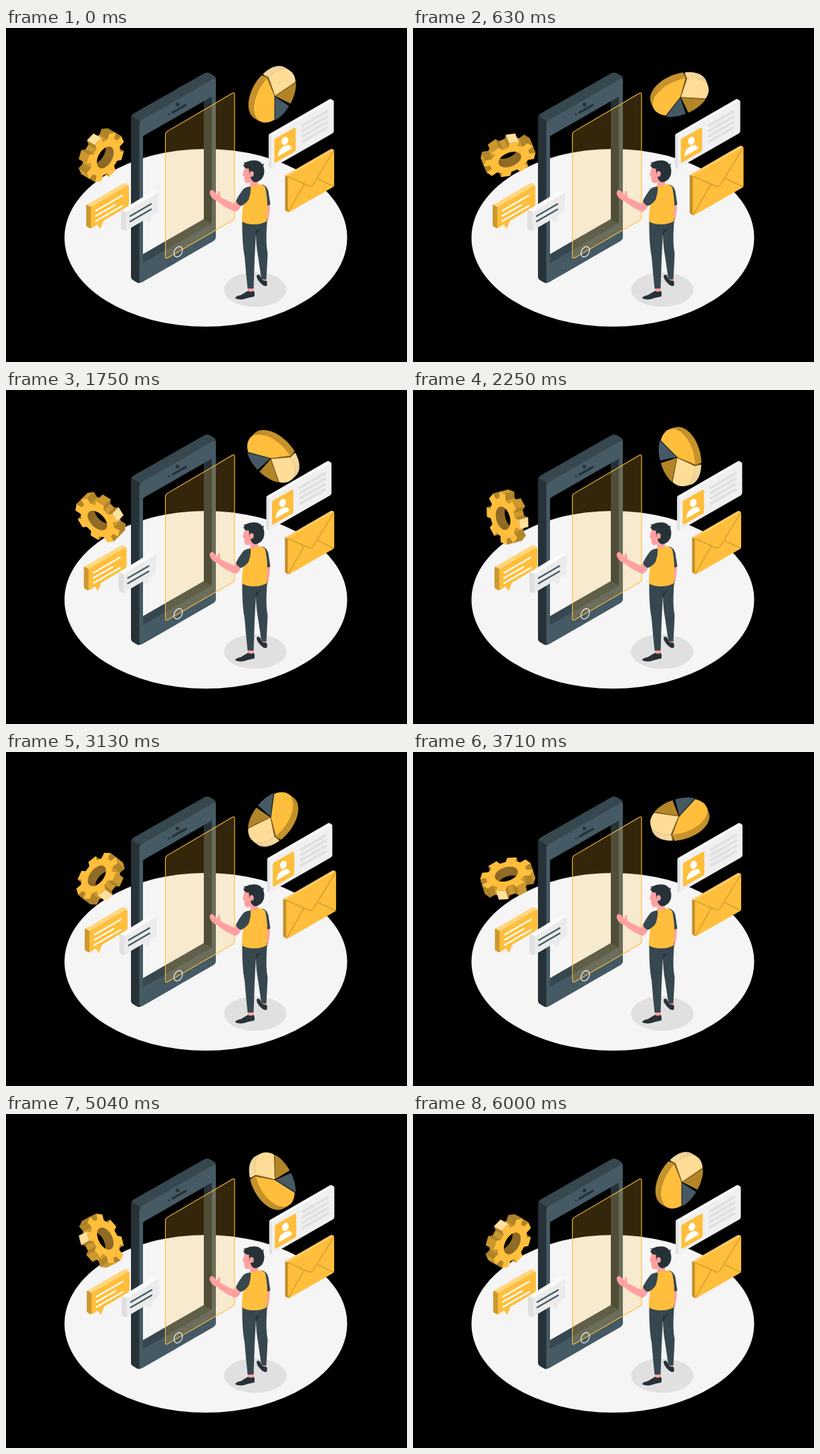
Recreate the animation shown at these times as an HTML page. Size 600x500 px, loop 6040 ms.

```html
<!DOCTYPE html>
<html lang="en">
<head>
<meta charset="utf-8">
<title>Mobile interface</title>
<style>
  html, body { margin: 0; width: 100%; height: 100%; overflow: hidden; background: #000; }
  svg { display: block; width: 600px; height: 500px; }
</style>
</head>
<body>
<svg viewBox="0 0 600 500" xmlns="http://www.w3.org/2000/svg">
  <ellipse cx="299" cy="314" rx="211.5" ry="133" fill="#f5f5f5"/>
  <ellipse cx="373" cy="391.7" rx="46.7" ry="25.8" fill="#e0e0e0"/>

  <g id="phone" fill-rule="evenodd">
    <path fill="#37474f" d="M187 135Q187 130.500 191 128L296 68.200Q301 65.500 305 67.800L311 71.200Q314 73 314 77L314 312Q314 316.500 310 319L205 379.600Q199 383 195 380.200L190 377.300Q187 375.500 187 371Z
      M205 163V338.500L296 286V109.500L207 160.500Q205 161.600 205 163Z"/>
    <path fill="#263238" d="M187 135Q187 133 188 131.500L200.500 139.500V381.300Q197 381.700 195 380.200L190 377.300Q187 375.500 187 371Z
      M296 109.500L309 102V293.500L296 286Z"/>
    <path fill="#455a64" d="M199.500 145Q199.500 140 204 137.500L309 77Q314 74.500 314 79L314 312Q314 316.500 310 319L205 379.600Q199.500 383 199.500 377Z
      M205 163V352L306 294Q308 292.700 308 290.500V104Q308 102.500 306.500 103.400L207 160.500Q205 161.600 205 163Z"/>
    <g fill="#263238">
      <circle cx="256.500" cy="114.500" r="2.800"/>
      <circle cx="244" cy="129.200" r="1.400"/>
      <path d="M249.300 126.500L269 115.200" stroke="#263238" stroke-width="3.400" stroke-linecap="round"/>
    </g>
  </g>

  <path d="M238.500 160Q238.500 156.500 241.500 154.600L339 97.500Q342 96 342 99.500V283Q342 286.300 339 288L242 344Q238.500 346 238.500 342Z"
    fill="#ffbe3b" fill-opacity=".2" stroke="#ffbe3b" stroke-width="1.100"/>
  <ellipse cx="257.700" cy="335" rx="5.700" ry="8.300" transform="rotate(28 257.700 335)" fill="none" stroke="#fff" stroke-width="1.100"/>

  <g id="man">
    <path fill="#ffa0a0" d="M362 385H370.500V396H362ZM382.500 372H390V382H383Z"/>
    <g fill="#ffa0a0">
      <path d="M390 262L395 262Q395 276 392.500 286Q391 292 388 294Z"/>
      <path d="M346 258L351 268Q346 276 342 275Q326 268 316 259Q308 256 306 251Q303 245 307 242.500Q310 242 313 246L317 250Q316 245 319 243.500Q321 246 320.500 253L341 263Z"/>
      <path d="M358 205Q355.500 214 354 220.500L356.500 222Q356 229 358.500 231.500Q362 233 365.500 231L365.500 240Q370 243 377 238L377 208Z"/>
    </g>
    <path fill="#37474f" d="M353.500 286Q353 322 357 342Q359 367 361.500 390H370.500Q371.500 360 372 345Q373 325 374 307Q374 325 377 341L382 375Q386 378 389.500 376Q391 353 391.500 337Q388 322 391 285Z"/>
    <path fill="#263238" d="M373 308L374.500 303L383 299Q377 304 374 311Z"/>
    <path fill="#37474f" d="M383 234Q390 236 392.500 244L395.500 264Q392 267 388 265Z"/>
    <path fill="#ffbe3b" d="M364.500 236Q370 239 377 234Q385 233.500 388 239Q391 252 391 266Q390 278 390.500 289Q383 294 371 294Q360 294 353 289.500Q353 268 358 252Z"/>
    <path fill="#37474f" d="M366 237.500Q357 237 353 244Q347 252 344 259Q346 264 351 266.500Q358 264 363 257Q367 246 366 237.500Z"/>
    <path fill="#263238" d="M355.300 201.500Q359 201.500 360 200.500Q366 197.500 373 198.300Q380 199 383.500 204Q385 204 386 202.500Q386 205 384.800 206Q388 214 385 222Q381 230 373 231Q368 230 366 224L366 221L364 219L363.500 210.500Q357 211 355 205Q356 204 357.500 204Z"/>
    <ellipse cx="367.500" cy="218.500" rx="3.200" ry="4.200" fill="#ffa0a0"/>
    <g fill="#263238">
      <path d="M362 393.500Q366 396 371 393.500Q373 399 371.300 402L362 404Q352 408.500 343 404.800Q343 401.500 351 400Z"/>
      <path d="M375 371Q376.500 368 380 370.500Q383 379.500 390 378.500Q391.500 383 390 386Q385 387 381 382Q375 376 375 371Z"/>
    </g>
  </g>

  <g id="gear"></g>
  <g id="pie"></g>

  <g class="shake">
    <path fill="#cc982f" d="M120 267Q120 264 122 264L128 267V299Q126 300.500 124 299L121.500 297.500Q120 296.500 120 295Z"/>
    <path fill="#ffd77f" d="M121 264.500L175 233Q177.500 231.700 180 233L183.500 235.500L128 268.500Z"/>
    <path fill="#ffbe3b" d="M127 271Q127 268.500 129 267L181 236.500Q184 235 184 238V263Q184 266 181.500 267.500L146 288.500L141 301L136.500 294L130 298.500Q127 300.500 127 297Z"/>
    <path fill="none" stroke="#fff" stroke-width="2.300" stroke-linecap="round" d="M134.500 273.500L174 250.700M134.500 281.300L163 264.900M134.500 289L174 266.200"/>
  </g>
  <g class="shake">
    <path fill="#e0e0e0" d="M172 275Q172 272 174 272L181 275V303Q178 304.500 176 303.200L173.500 301.700Q172 300.800 172 299Z"/>
    <path fill="#fafafa" d="M173 272.500L219 244.500Q222 242.500 224 244L227.500 246.500L181 276Z"/>
    <path fill="#ebebeb" d="M179.500 279Q179.500 276 182 274.500L225 248Q228 246 228 249V272Q228 275 225.500 276.500L218 281L215 292L208.500 286.500L183 301.500Q179.500 303.500 179.500 300Z"/>
    <path stroke="#455a64" stroke-width="2.500" stroke-linecap="round" d="M186 281.500L217 263.500M186 289.500L217 271.500"/>
  </g>
  <g class="shake">
    <path fill="#e0e0e0" d="M393 161Q393 158.500 395 158.500L398 161V209.500Q396.500 210.500 394.500 209Q393 208 393 206Z"/>
    <path fill="#fafafa" d="M393.500 159L484 106.700Q485.500 106 487 106.800L490 109L397.500 162Z"/>
    <path fill="#f0f0f0" d="M396.800 163.500Q396.800 161.500 398.500 160.500L488.500 108.700Q490.500 107.700 490.500 110V154Q490.500 156.500 488.500 157.700L399 209Q396.800 210.500 396.800 207.500Z"/>
    <path fill="#ffbe3b" d="M401.500 168.500Q401.500 166.500 403.500 165.300L431 149.500Q433.500 148.300 433.500 151V181.500Q433.500 184 431.500 185.200L404 201Q401.500 202.300 401.500 199.500Z"/>
    <ellipse cx="417.300" cy="169" rx="4.800" ry="6.300" transform="rotate(22 417.300 169)" fill="#fff"/>
    <path fill="#fff" d="M407 192.500Q407 183 414.500 177.800Q425 171.500 427.500 180.500Z"/>
    <path stroke="#e0e0e0" stroke-width="4" d="M442.500 146.700L482 124M442.500 154.700L482 132M442.500 162.700L482 140M442.500 170.700L482 148"/>
  </g>

  <g id="envelope">
    <path fill="#c28f2b" d="M417.500 222Q417.500 219.700 419.500 220L423 222V275.800L419 274Q417.500 273 417.500 271.500Z"/>
    <path fill="#ffcb62" d="M418 220.600L486 181.200Q487.500 180.500 489 181.500L491 183L422.500 223Z"/>
    <path fill="#ffbe3b" d="M421.800 224Q421.800 222.300 423.500 221.300L489 183.500Q491 182.500 491 184.500V235Q491 237 489.500 238L424 275.500Q421.800 276.700 421.800 274Z"/>
    <path fill="none" stroke="#b2852a" stroke-width=".9" stroke-linejoin="round" d="M422 222.500L454 236.500Q457.500 237.500 459.500 234L490.700 183.500M422.500 275L446.500 233.500M490.500 237L466 225.500"/>
  </g>
</svg>
<script>
const NS = 'http://www.w3.org/2000/svg';
const byId = id => document.getElementById(id);
const rad = degrees => degrees * Math.PI / 180;
const toPath = points => 'M' + points.map(p => p.map(n => n.toFixed(2)).join(' ')).join('L') + 'Z';

function addPath(parent, d, fill, stroke) {
  const path = document.createElementNS(NS, 'path');
  path.setAttribute('d', d);
  path.setAttribute('fill', fill);
  path.setAttribute('fill-rule', 'evenodd');
  if (stroke) {
    path.setAttribute('stroke', stroke);
    path.setAttribute('stroke-width', .3);
    path.setAttribute('stroke-linejoin', 'round');
  }
  parent.append(path);
}

// Isometric projection of a polar point on an upright plane.
const project = (cx, cy) => (radius, degrees) => {
  const u = radius * Math.cos(rad(degrees));
  const v = radius * Math.sin(rad(degrees));
  return [cx + .866 * u, cy - .5 * u + v];
};

// Walls that face the viewer, nearest to the depth direction drawn last.
function addWalls(parent, points, [dx, dy], colorOf) {
  points.map((a, i) => {
    const b = points[(i + 1) % points.length];
    const facing = (b[1] - a[1]) * dx - (b[0] - a[0]) * dy;
    return { a, b, i, facing, order: (a[0] + b[0]) * dx + (a[1] + b[1]) * dy };
  }).filter(w => w.facing > 0).sort((p, q) => p.order - q.order).forEach(({ a, b, i }) => {
    const color = colorOf(i);
    addPath(parent, toPath([a, b, [b[0] + dx, b[1] + dy], [a[0] + dx, a[1] + dy]]), color, color);
  });
}

function buildGear() {
  const parent = byId('gear');
  const at = project(148.5, 193.7);
  const depth = [-11.7, -6.8];
  const outline = [];
  for (let k = 0; k < 8; k++) {
    const mid = 22.5 + 45 * k;
    outline.push(at(25.5, mid - 14), at(33, mid - 10.5), at(33, mid + 10.5), at(25.5, mid + 14));
  }
  const hole = [];
  for (let a = 0; a < 360; a += 6) hole.push(at(14.5, a));

  const tipColors = { 5: '#ffdf9d', 6: '#b28529' };
  addWalls(parent, [...hole].reverse(), depth, () => '#99722a');
  addWalls(parent, outline, depth, i =>
    i % 4 === 1 ? tipColors[(i - 1) / 4] || '#cc982f' : i % 4 === 3 ? '#cc982f' : '#b28529');
  addPath(parent, toPath(outline) + toPath(hole), '#ffbe3b');
}

function buildPie() {
  const parent = byId('pie');
  const depth = [-8, -4.6];
  const slices = [
    { from: 47, to: 89, face: '#455a64', rim: '#37474f', cut: '#263238', shift: [.3, 1] },
    { from: -4, to: 43, face: '#b28529', rim: '#7d5d1d', cut: '#7d5d1d', shift: [.8, 0] },
    { from: -109, to: -5, face: '#ffdd97', rim: '#ffe2a6', cut: '#7d5d1d', shift: [.3, -.8] },
    { from: 90, to: 249, face: '#ffbe3b', rim: '#cc982f', cut: '#7d5d1d', shift: [-.8, 0] }
  ].map(slice => {
    const { from, to, shift } = slice;
    const at = project(402.4 + shift[0], 102 + shift[1]);
    const steps = Math.ceil((to - from) / 4);
    const arc = Array.from({ length: steps + 1 }, (_, i) => at(35.4, from + (to - from) * i / steps));
    return { ...slice, points: [at(0, 0), ...arc] };
  });
  // The faces share one plane, so they all cover the walls behind them.
  for (const { points, rim, cut } of slices) {
    addWalls(parent, points, depth, i => i === 0 || i === points.length - 1 ? cut : rim);
  }
  for (const { points, face } of slices) addPath(parent, toPath(points), face);
}

// Linear interpolation between [position, value] stops.
function track(stops, p) {
  const i = Math.max(1, stops.findIndex(s => s[0] >= p));
  const [p0, v0] = stops[i - 1], [p1, v1] = stops[i];
  return v0 + (v1 - v0) * (p - p0) / (p1 - p0);
}

const shakeStops = [0, -1, 2, -4, 4, -4, 4, -4, 2, -1, 0].map((v, i) => [i / 10, v]);
const beatStops = [[0, 1], [.1, 1.1], [.3, 1], [.4, 1], [.5, 1.1], [.6, 1], [1, 1]];
const LOOP = 6040, CYCLE = 6000;
const shakers = document.querySelectorAll('.shake');

function render(time) {
  const p = time % LOOP / CYCLE % 1;
  byId('gear').setAttribute('transform', `rotate(${360 * p} 142 190)`);
  byId('pie').setAttribute('transform', `rotate(${360 * p} 399 100)`);
  const x = track(shakeStops, p);
  shakers.forEach(el => el.setAttribute('transform', `translate(${x} 0)`));
  byId('envelope').setAttribute('transform',
    `translate(454.3 228.6) scale(${track(beatStops, p)}) translate(-454.3 -228.6)`);
}

buildGear();
buildPie();
const start = performance.now();
(function tick() {
  render(performance.now() - start);
  requestAnimationFrame(tick);
})();
</script>
</body>
</html>
```
